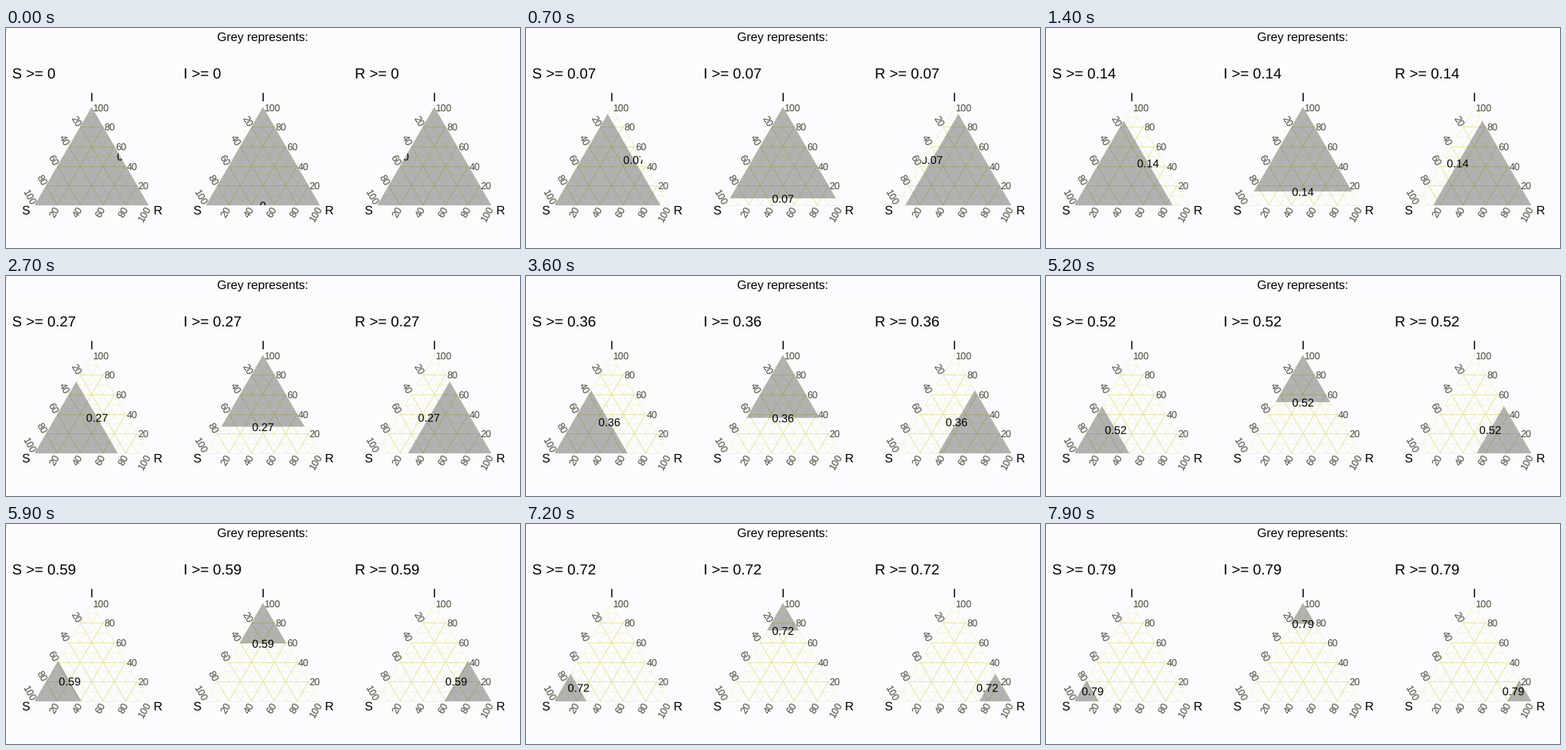
A matplotlib script for the animation above (8000 ms loop, 672 px wide and 288 px high).

```python
import numpy as np
import matplotlib.pyplot as plt
from matplotlib.animation import FuncAnimation
from matplotlib.patches import PathPatch, Polygon
from matplotlib.textpath import TextPath
from matplotlib.transforms import Affine2D

W, H, DPI = 672, 288, 96
FRAMES, INTERVAL = 80, 100
PX = 72 / DPI
BG, INK, TICK = "#fcfcfe", "#000000", "#48483a"
MAJOR, MINOR = "#e6e69c", "#f1f1cb"
VALUE_SIZE = 14.7

plt.rcParams["font.family"] = "Liberation Sans"
plt.rcParams["text.hinting"] = "none"

fig = plt.figure(figsize=(W / DPI, H / DPI), dpi=DPI, facecolor=BG)
ax = fig.add_axes([0, 0, 1, 1])
ax.set(xlim=(0, W), ylim=(H, 0))
ax.axis("off")


def put(x, y, s, size, rot=0, ha="left", color=INK, drop=0.0):
    """Text anchored on its baseline, shifted `drop` px along its own down direction."""
    a = np.radians(rot)
    return ax.text(x + drop * np.sin(a), y + drop * np.cos(a), s,
                   fontsize=size * PX, rotation=rot, rotation_mode="anchor",
                   ha=ha, va="baseline", color=color, zorder=4)


def line(p, q, color, width):
    ax.plot(*zip(p, q), color=color, lw=width * PX, zorder=1,
            solid_capstyle="butt")


class Panel:
    def __init__(self, left, name, corner):
        self.name = name
        self.pts = np.array([[37.5, 232], [112, 103.5], [186.3, 232]]) + [left, 0]
        self.corner = self.pts[corner]
        self.others = np.delete(self.pts, corner, axis=0)
        self.grid()
        self.labels()
        self.title = put(left + 7.5, 66.3, "", 19.2)
        self.area = ax.add_patch(Polygon(self.pts, fc="#333333", alpha=0.37, lw=0, zorder=2))
        self.value = ax.add_patch(PathPatch(TextPath((0, 0), "0"), fc=INK, lw=0, zorder=3))
        self.value.set_clip_path(Polygon(self.pts, transform=ax.transData))

    def grid(self):
        for k in range(3):
            a, b, c = np.roll(self.pts, k, axis=0)
            line(b, c, MINOR, 0.8)
            for n in range(1, 10):
                t = n / 10
                color, width = (MINOR, 0.7) if n % 2 else (MAJOR, 1.0)
                line(b + t * (a - b), c + t * (a - c), color, width)

    def labels(self):
        s, i, r = self.pts
        gap = 2.4
        dx, dy = gap * np.cos(np.pi / 3), gap * np.sin(np.pi / 3)
        for n in range(20, 101, 20):
            t = n / 100
            x, y = r + t * (i - r)
            put(x + 1.2, y + 0.4, n, 12.8, color=TICK, drop=4.5)
            x, y = i + t * (s - i)
            put(x - dx, y - dy, n, 12.8, -60, "right", TICK, 5.5)
            x, y = s + t * (r - s)
            put(x - dx, y + dy, n, 12.8, 60, "right", TICK, 5.5)
        put(s[0] - 12, 244.3, "S", 16, ha="center")
        put(i[0], 95.8, "I", 16, ha="center")
        put(r[0] + 12.3, 244.3, "R", 16, ha="center")

    def update(self, v):
        text = f"{v:g}"
        self.title.set_text(f"{self.name} >= {text}")
        ends = self.corner + (1 - v) * (self.others - self.corner)
        self.area.set_xy(np.vstack([self.corner, ends]))
        x, y = ends.mean(axis=0)
        glyphs = TextPath((0, 0), text, size=VALUE_SIZE)
        box = glyphs.get_extents()
        place = Affine2D().scale(1, -1).translate(x - (box.x0 + box.x1) / 2,
                                                  y + 0.5 + VALUE_SIZE * 0.35)
        self.value.set_path(place.transform_path(glyphs))


put(W / 2, 17, "Grey represents:", 16, ha="center")
panels = [Panel(224 * k, name, k) for k, name in enumerate("SIR")]


def draw(n):
    for p in panels:
        p.update(n / 100)
    return []


anim = FuncAnimation(fig, draw, frames=FRAMES, interval=INTERVAL,
                     repeat=True, repeat_delay=0, blit=False)
plt.show()
```
